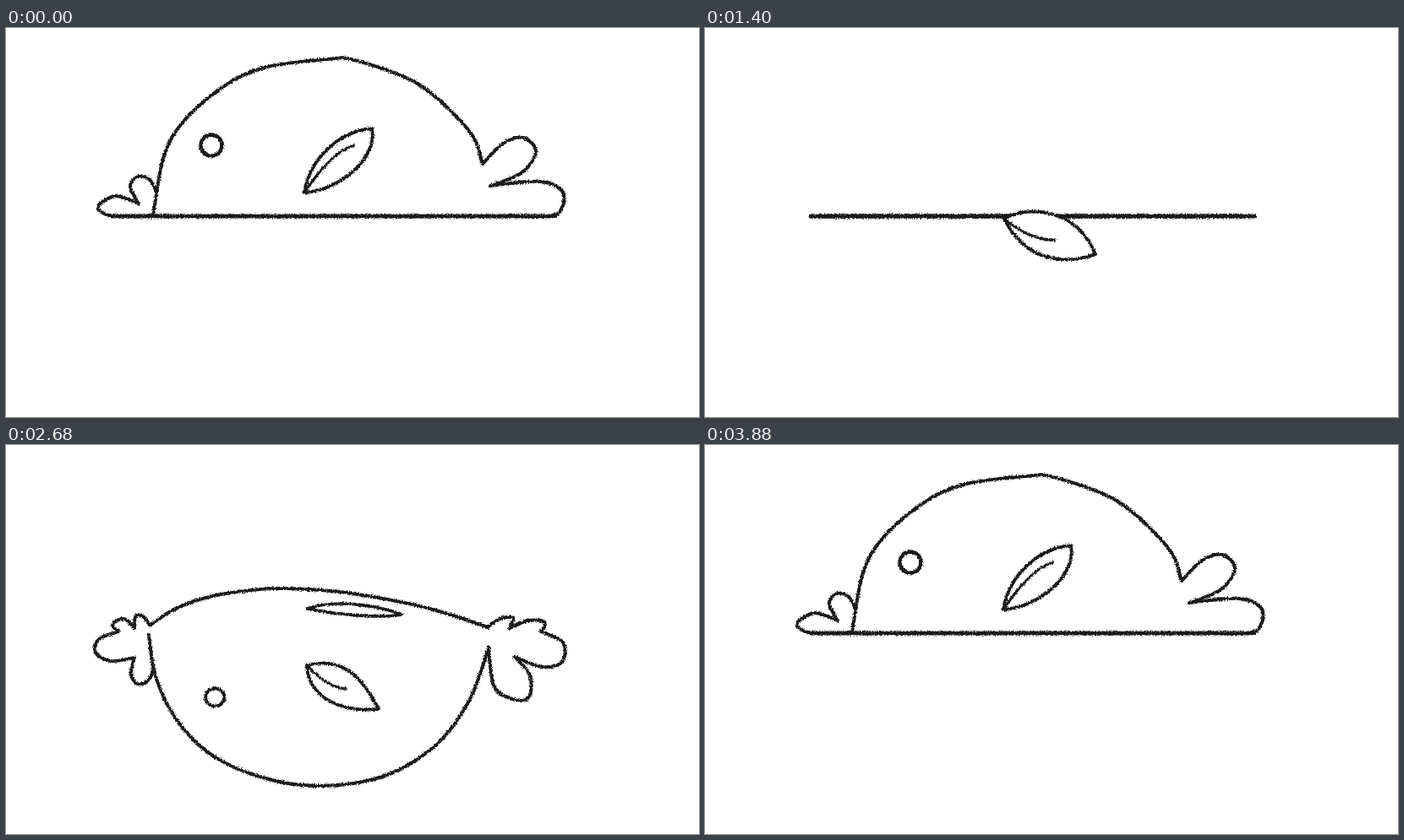
Recreate the animation shown at these times as an HTML page. Size 820 by 461 pixels, loop 4 s.

```html
<!DOCTYPE html>
<html lang="en">
<head>
<meta charset="utf-8">
<title>Rolling fish</title>
<style>
  html, body { margin: 0; width: 100%; height: 100%; overflow: hidden; background: #fff; }
  svg { display: block; width: 820px; height: 461px; }
  path, ellipse { fill: none; stroke: #1b1a1b; stroke-width: 4; stroke-linecap: round; stroke-linejoin: round; }
</style>
</head>
<body>
<svg viewBox="0 0 820 461">
  <filter id="chalk" filterUnits="userSpaceOnUse" x="0" y="0" width="820" height="461" color-interpolation-filters="sRGB">
    <feTurbulence type="fractalNoise" baseFrequency="0.6" numOctaves="2"/>
    <feDisplacementMap in="SourceGraphic" scale="4" xChannelSelector="R" yChannelSelector="G"/>
    <feGaussianBlur stdDeviation="0.45"/>
  </filter>
  <g id="art" filter="url(#chalk)"></g>
</svg>
<script>
const LOOP = 4000, STEP = 40, WATER = 223;
const art = document.getElementById('art');
const noise = document.querySelector('feTurbulence');
const nums = s => s.split(/[ ,]+/).map(Number);
const mix = (a, b, k) => a.map((v, i) => v + (b[i] - v) * k);

// Value of a keyframe track [[time, numbers], ...] at time t
function at(track, t) {
  const i = track.findIndex(k => k[0] > t);
  if (i === 0) return track[0][1];
  if (i < 0) return track[track.length - 1][1];
  const [t0, a] = track[i - 1], [t1, b] = track[i];
  return mix(a, b, (t - t0) / (t1 - t0));
}
const curve = pairs => pairs.map(([t, v]) => [t, [v]]);

// Smooth path through a flat list of points
function spline(p) {
  const n = p.length / 2;
  const pt = i => { i = Math.max(0, Math.min(n - 1, i)); return [p[2 * i], p[2 * i + 1]]; };
  let d = 'M' + pt(0);
  for (let i = 0; i < n - 1; i++) {
    const [a, b, c, e] = [pt(i - 1), pt(i), pt(i + 1), pt(i + 2)];
    d += 'C' + [0, 1].map(k => b[k] + (c[k] - a[k]) / 6) + ' ' + [0, 1].map(k => c[k] - (e[k] - b[k]) / 6) + ' ' + c;
  }
  return d;
}

// A part runs from a flat stretch of the water line through its raised poses
function part(from, to, ...poses) {
  poses = poses.map(nums);
  const n = poses[0].length / 2;
  const flat = poses[0].map((_, i) => i % 2 ? WATER : from + (to - from) * (i - i % 2) / 2 / (n - 1));
  return [flat, ...poses];
}
function pose(part, s) {
  const i = Math.max(0, Math.min(part.length - 2, Math.floor(s)));
  return mix(part[i], part[i + 1], s - i);
}

const upperDome = part(170, 570,
  '170 214 195 197 220 186 260 176 320 170 385 173 440 181 490 191 532 203 570 216',
  '172 204 195 175 220 153 260 128 310 113 372 106 435 112 495 137 540 165 570 194',
  '174 223 186 155 208 113 255 71 305 47 380 37 412 38 487 66 548 122 564 161');
const upperFins = [
  part(170, 152, '169 212 162 203 155 202 152 208 152 217',
    '172 204 171 194 161 187 151 196 150 212', '177 192 169 179 156 176 147 188 157 208'),
  part(152, 133, '152 217 140 206 127 211 128 217 133 221',
    '150 212 132 201 119 209 124 217 133 222', '157 208 130 199 109 211 118 221 135 223'),
  part(570, 596, '570 216 580 208 592 204 600 205 599 210 596 217',
    '570 194 578 172 593 162 605 168 603 185 593 204', '564 161 588 137 612 130 627 146 611 171 573 187'),
  part(596, 636, '596 217 618 208 636 209 637 215 633 221',
    '593 204 625 194 648 197 654 210 636 220', '573 187 632 182 659 195 655 218 636 224')
];
const lowerDome = part(170, 570,
  '165 228 180 262 207 297 250 331 310 350 370 356 440 351 505 328 548 290 570 237',
  '169 225 177 274 200 323 240 365 300 393 367 404 445 393 507 357 548 303 571 240');
const lowerFins = [
  part(125, 154, '135 222 115 230 110 246 124 256 154 254', '133 221 110 230 106 246 124 256 152 252'),
  part(154, 172, '154 254 149 273 160 284 172 274 173 248', '152 252 148 272 157 284 170 277 174 264'),
  part(650, 597, '640 223 663 236 660 259 637 263 597 245', '633 221 659 234 658 257 634 263 602 251'),
  part(597, 570, '597 245 622 269 625 296 603 305 577 288 570 237', '602 251 620 273 619 298 603 302 578 287 571 240')
];

// Side leaf: base, two controls, tip, two controls, vein control, vein end
const leafHigh = nums('353 195 359 155 395 122 433 119 440 155 395 192 385 147 412 139');
const leafOnLine = nums('355 225 352 185 395 145 440 153 440 190 410 226 380 201 402 184');
const leafLevel = nums('354 225 390 190 440 190 478 212 440 225 395 232 385 215 412 214');
const leafOver = nums('354 226 385 209 440 215 462 268 440 276 385 287 385 252 414 251');
const leafHang = nums('354 226 396 220 430 245 446 290 400 300 372 268 380 254 408 264');
const leafSunk = nums('353 253 395 252 424 275 436 311 390 325 372 290 380 283 406 294');
const leafLow = nums('356 261 400 250 422 277 441 313 400 317 358 302 380 287 402 289');
const leafThin = nums('357 194 390 182 440 190 468 201 440 206 385 200 357 194 357 194');
const leafRisen = nums('356 193 353 165 390 128 436 121 440 160 405 193 375 160 397 153');

const mainLeaf = [[80, leafHigh], [280, leafHigh], [640, leafOnLine], [880, leafOnLine], [1160, leafLevel],
  [1400, leafOver], [1500, leafHang], [1640, leafHang], [1880, leafSunk], [2040, leafLow]];
const newLeaf = [[2680, leafThin], [3080, leafRisen], [3600, leafHigh]];

// Eyes: centre, radii, tilt, line width
const eyeOpen = nums('243 139 12.5 12.5 0 4.5');
const upperEye = [[80, eyeOpen], [240, nums('243 126 12.5 13 0 4.5')], [400, nums('243 156 12 9 -8 4')],
  [520, nums('243 205 8 2 -15 3')], [560, nums('243 216 0 0 0 3')], [3000, nums('243 142 0 0 -25 2')],
  [3080, nums('244 145 8 4 -25 2.5')], [3280, nums('243 141 11 10 0 4')], [3480, eyeOpen]];
const lowerEye = [[1760, nums('250 262 0 0 0 3')], [1880, nums('250 301 9.5 9.5 0 4')],
  [2040, nums('246 299 11.5 11 0 4')], [3080, nums('248 299 11 10 0 4')], [3440, nums('248 299 11 10 0 4')],
  [3600, nums('247 275 9 5 15 3')], [3680, nums('247 250 0 0 15 3')]];

const upperRise = curve([[80, 3], [160, 3.25], [240, 3.45], [320, 3.2], [400, 2.35], [480, 1.2], [560, .3], [640, 0],
  [2200, 0], [2680, 1], [3080, 2], [3320, 2.6], [3560, 3.09], [3680, 3.09], [3880, 3]]);
const lowerDrop = curve([[1640, 0], [1720, .15], [1800, .5], [1880, 1], [1960, 2.82], [2040, 2],
  [3360, 2], [3440, 2.2], [3560, 1.4], [3680, .6], [3800, 0]]);

const stroke = (d, style = '') => `<path d="${d}" style="${style}"/>`;

function leaf(p, width) {
  const [x, y, a, b, c, d, tx, ty, e, f, g, h, qx, qy, vx, vy] = p;
  return stroke(`M${x} ${y}C${a} ${b} ${c} ${d} ${tx} ${ty}C${e} ${f} ${g} ${h} ${x} ${y}Z`, `fill:#fff;stroke-width:${width}`)
    + stroke(`M${x} ${y}Q${qx} ${qy} ${vx} ${vy}`, `stroke-width:${width - .5}`);
}
function eye([x, y, rx, ry, tilt, width]) {
  return rx < 1 ? '' :
    `<ellipse cx="${x}" cy="${y}" rx="${rx}" ry="${ry}" transform="rotate(${tilt} ${x} ${y})" style="stroke-width:${width}"/>`;
}

function draw(t) {
  const up = at(upperRise, t)[0], down = at(lowerDrop, t)[0];
  const raise = (p, s) => t < 800 ? mix(p[0], p[3], s / 3) : pose(p, s);
  const half = (shape, flat) => stroke(spline(shape), flat ? 'stroke-width:4.8' : '');
  let out = half(raise(upperDome, up), up === 0) + half(pose(lowerDome, down), down === 0);
  for (const fin of upperFins) out += half(raise(fin, Math.min(up, 3.1)), up === 0);
  for (const fin of lowerFins) out += half(pose(fin, Math.min(down, 2.1)), down === 0);
  out += eye(at(upperEye, t)) + eye(at(lowerEye, t));
  if (t < 3360 || down > .2) {
    const squash = t < 3360 ? 1 : Math.min(1, down);
    out += leaf(at(mainLeaf, t).map((v, i) => i % 2 ? WATER + (v - WATER) * squash : v), 3.8);
  }
  if (t >= 2560) {
    const lift = Math.max(0, 2680 - t) / 12;
    out += leaf(at(newLeaf, t).map((v, i) => i % 2 ? v + lift : v), 3.7);
  }
  art.innerHTML = out;
  noise.setAttribute('seed', t / STEP);
}

// The drawing rests in these spans and changes every STEP elsewhere
const holds = [[0, 120], [760, 920], [1520, 1680], [2040, 2240]];
let shown = -1;
function tick() {
  let t = Math.floor(performance.now() % LOOP / STEP) * STEP;
  if (t >= 3880) t = 0;
  const hold = holds.find(([a, b]) => t >= a && t < b);
  if (hold) t = hold[0];
  if (t !== shown) draw(shown = t);
  requestAnimationFrame(tick);
}
tick();
</script>
</body>
</html>
```
